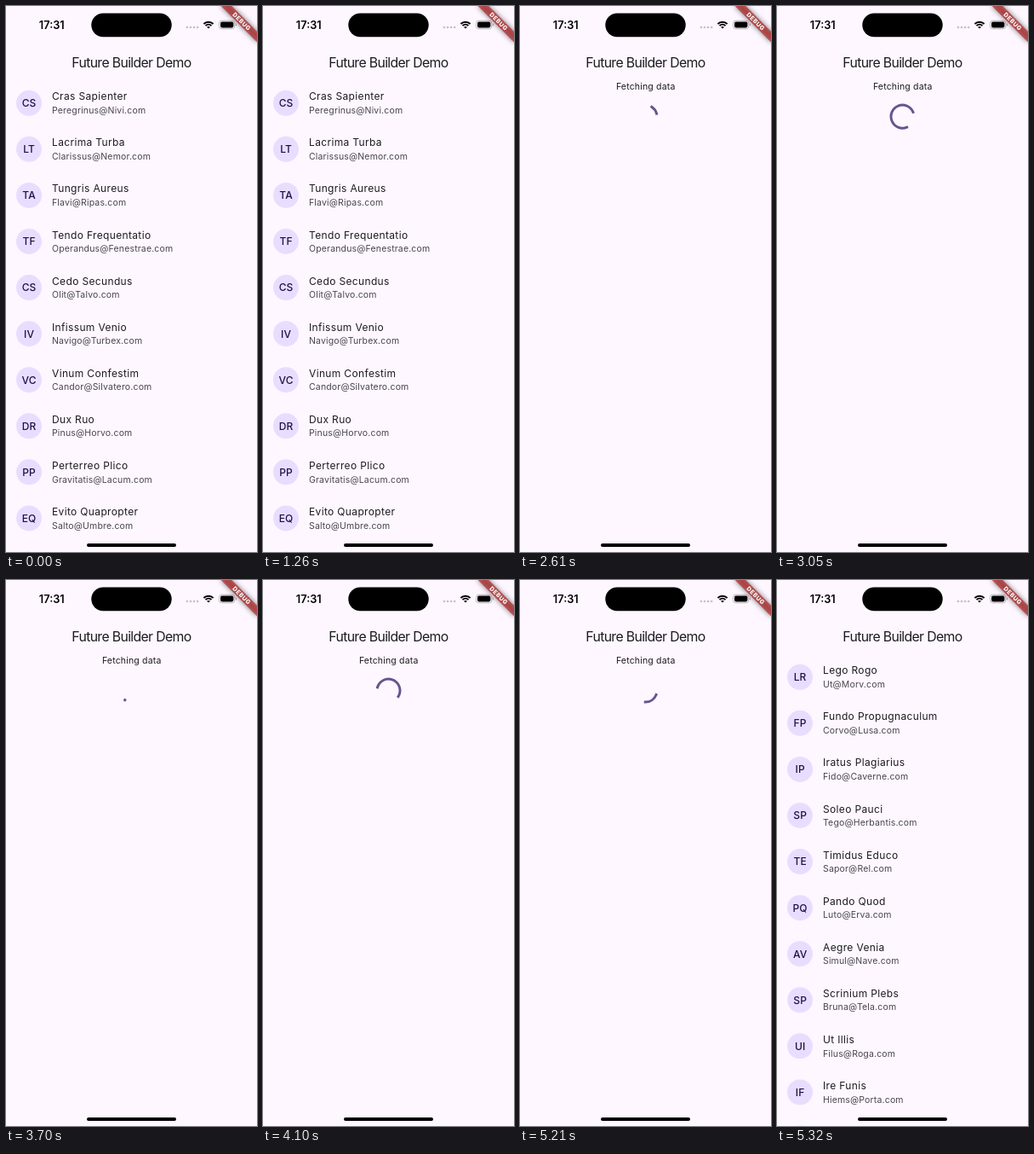
An HTML page with a canvas that plays this animation: 295x640 px, repeating every 7260 ms.

```html
<!DOCTYPE html>
<html lang="en">
<head>
<meta charset="utf-8">
<title>Future Builder Demo</title>
<style>
html, body { margin: 0; width: 100%; height: 100%; overflow: hidden; background: #fef7ff; }
canvas { display: block; width: 295px; height: 640px; }
</style>
</head>
<body>
<canvas id="stage"></canvas>
<script>
const W = 295, H = 640, LOOP = 7260;
const INK = '#1d1b20', SOFT = '#49454f', ACCENT = '#65558f';
const AVATAR = '#e9ddff', ON_AVATAR = '#211047', SURFACE = '#fef7ff';

const before = [
  ['Cras Sapienter', 'Peregrinus@Nivi.com'],
  ['Lacrima Turba', 'Clarissus@Nemor.com'],
  ['Tungris Aureus', 'Flavi@Ripas.com'],
  ['Tendo Frequentatio', 'Operandus@Fenestrae.com'],
  ['Cedo Secundus', 'Olit@Talvo.com'],
  ['Infissum Venio', 'Navigo@Turbex.com'],
  ['Vinum Confestim', 'Candor@Silvatero.com'],
  ['Dux Ruo', 'Pinus@Horvo.com'],
  ['Perterreo Plico', 'Gravitatis@Lacum.com'],
  ['Evito Quapropter', 'Salto@Umbre.com']
];
const after = [
  ['Lego Rogo', 'Ut@Morv.com'],
  ['Fundo Propugnaculum', 'Corvo@Lusa.com'],
  ['Iratus Plagiarius', 'Fido@Caverne.com'],
  ['Soleo Pauci', 'Tego@Herbantis.com'],
  ['Timidus Educo', 'Sapor@Rel.com'],
  ['Pando Quod', 'Luto@Erva.com'],
  ['Aegre Venia', 'Simul@Nave.com'],
  ['Scrinium Plebs', 'Bruna@Tela.com'],
  ['Ut Illis', 'Filus@Roga.com'],
  ['Ire Funis', 'Hiems@Porta.com']
];

// Loading runs in even steps within each span: [start, end, steps]
const spans = [[2290, 3050, 7], [3050, 3800, 7], [3800, 4620, 8], [4620, 5320, 6]];
const LOAD_START = spans[0][0], LOAD_END = spans[3][1], SPIN_START = 2365;

const canvas = document.getElementById('stage');
const ctx = canvas.getContext('2d');
const dpr = window.devicePixelRatio || 1;
canvas.width = W * dpr;
canvas.height = H * dpr;

function text(str, x, y, size, color, { weight = 400, spacing = 0, align = 'left' } = {}) {
  ctx.font = `${weight} ${size}px Inter, Roboto, sans-serif`;
  ctx.letterSpacing = spacing + 'px';
  ctx.textAlign = align;
  ctx.fillStyle = color;
  ctx.fillText(str, x, y);
}

function pill(x, y, w, h, r, color) {
  ctx.fillStyle = color;
  ctx.beginPath();
  ctx.roundRect(x, y, w, h, r);
  ctx.fill();
}

function disc(x, y, r, color) {
  ctx.fillStyle = color;
  ctx.beginPath();
  ctx.arc(x, y, r, 0, 2 * Math.PI);
  ctx.fill();
}

function arc(x, y, r, from, sweep, width, color, cap = 'butt') {
  ctx.strokeStyle = color;
  ctx.lineWidth = width;
  ctx.lineCap = cap;
  ctx.beginPath();
  ctx.arc(x, y, r, from, from + sweep);
  ctx.stroke();
}

function statusBar() {
  text('17:31', 53.8, 26.6, 12.75, '#000', { weight: 600, align: 'center' });
  pill(100.3, 8.4, 94.4, 27.8, 13.9, '#000');
  for (let i = 0; i < 4; i++) disc(212.9 + 4.1 * i, 25, 1.35, '#c6c0c8');

  const from = -0.75 * Math.PI, sweep = Math.PI / 2;
  arc(238, 26.6, 7.9, from, sweep, 1.9, '#000');
  arc(238, 26.6, 4.9, from, sweep, 1.9, '#000');
  arc(238, 26.6, 1.35, from, sweep, 2.7, '#000');

  ctx.strokeStyle = '#a9a4aa';
  ctx.lineWidth = 0.8;
  ctx.beginPath();
  ctx.roundRect(250.6, 17.2, 18.2, 9.6, 3);
  ctx.stroke();
  pill(252, 18.6, 15.4, 6.8, 1.8, '#000');
  pill(269.9, 20.4, 1, 3.2, 0.5, '#a9a4aa');
}

function banner() {
  ctx.save();
  ctx.translate(W, 0);
  ctx.rotate(Math.PI / 4);
  ctx.filter = 'blur(3px)';
  ctx.fillStyle = 'rgba(0,0,0,0.5)';
  ctx.fillRect(-30, 21, 60, 9);
  ctx.filter = 'none';
  ctx.fillStyle = 'rgba(183,28,28,0.63)';
  ctx.fillRect(-30, 21, 60, 9);
  text('DEBUG', 0.2, 28, 7, '#fff', { weight: 800, spacing: 0.5, align: 'center' });
  ctx.restore();
}

const initials = name => name.split(' ').map(word => word[0]).join('');

function list(people) {
  for (let i = 0; i <= people.length; i++) {
    const y = 113.8 + 54.07 * i;
    disc(27, y, 15, AVATAR);
    if (i === people.length) break;
    const [name, mail] = people[i];
    text(initials(name), 27.1, y + 4.4, 12, ON_AVATAR, { weight: 500, spacing: 0.1, align: 'center' });
    text(name, 54, y - 3.5, 12, INK, { spacing: 0.35 });
    text(mail, 54, y + 12.2, 10.5, SOFT, { spacing: 0.16 });
  }
}

// Cubic bezier (0.4, 0, 0.2, 1), solved by bisection
function ease(x) {
  if (x <= 0) return 0;
  if (x >= 1) return 1;
  const bez = (a, b, s) => 3 * (1 - s) ** 2 * s * a + 3 * (1 - s) * s * s * b + s ** 3;
  let lo = 0, hi = 1;
  for (let i = 0; i < 24; i++) {
    const mid = (lo + hi) / 2;
    if (bez(0.4, 0.2, mid) < x) lo = mid; else hi = mid;
  }
  return bez(0, 1, lo);
}

function spinner(ms) {
  const phase = (ms % 1333) / 1333;
  const head = ease(phase * 2), tail = ease(phase * 2 - 1);
  const turn = ms / 2222;
  const start = Math.PI * (-0.5 + 1.5 * tail + 2 * turn + 0.5 * phase);
  const sweep = Math.max(1.5 * Math.PI * (head - tail), 0.001);
  arc(147.5, 129.6, 13.5, start, sweep, 3, ACCENT, 'square');
}

function stepTime(t) {
  const [from, to, steps] = spans.find(span => t < span[1]);
  const size = (to - from) / steps;
  return from + Math.floor((t - from) / size) * size;
}

function draw(t) {
  ctx.setTransform(dpr, 0, 0, dpr, 0, 0);
  ctx.fillStyle = SURFACE;
  ctx.fillRect(0, 0, W, H);
  text('Future Builder Demo', 147.4, 71.6, 15.8, INK, { spacing: -0.65, align: 'center' });
  if (t >= LOAD_START && t < LOAD_END) {
    text('Fetching data', 147.7, 97.8, 10.5, INK, { spacing: 0.18, align: 'center' });
    spinner(Math.max(0, stepTime(t) - SPIN_START));
  } else {
    list(t < LOAD_START ? before : after);
  }
  statusBar();
  banner();
  pill(95, 630, 105, 4, 2, '#000');
}

const origin = performance.now();
function tick() {
  draw((performance.now() - origin) % LOOP);
  requestAnimationFrame(tick);
}
tick();
</script>
</body>
</html>
```
